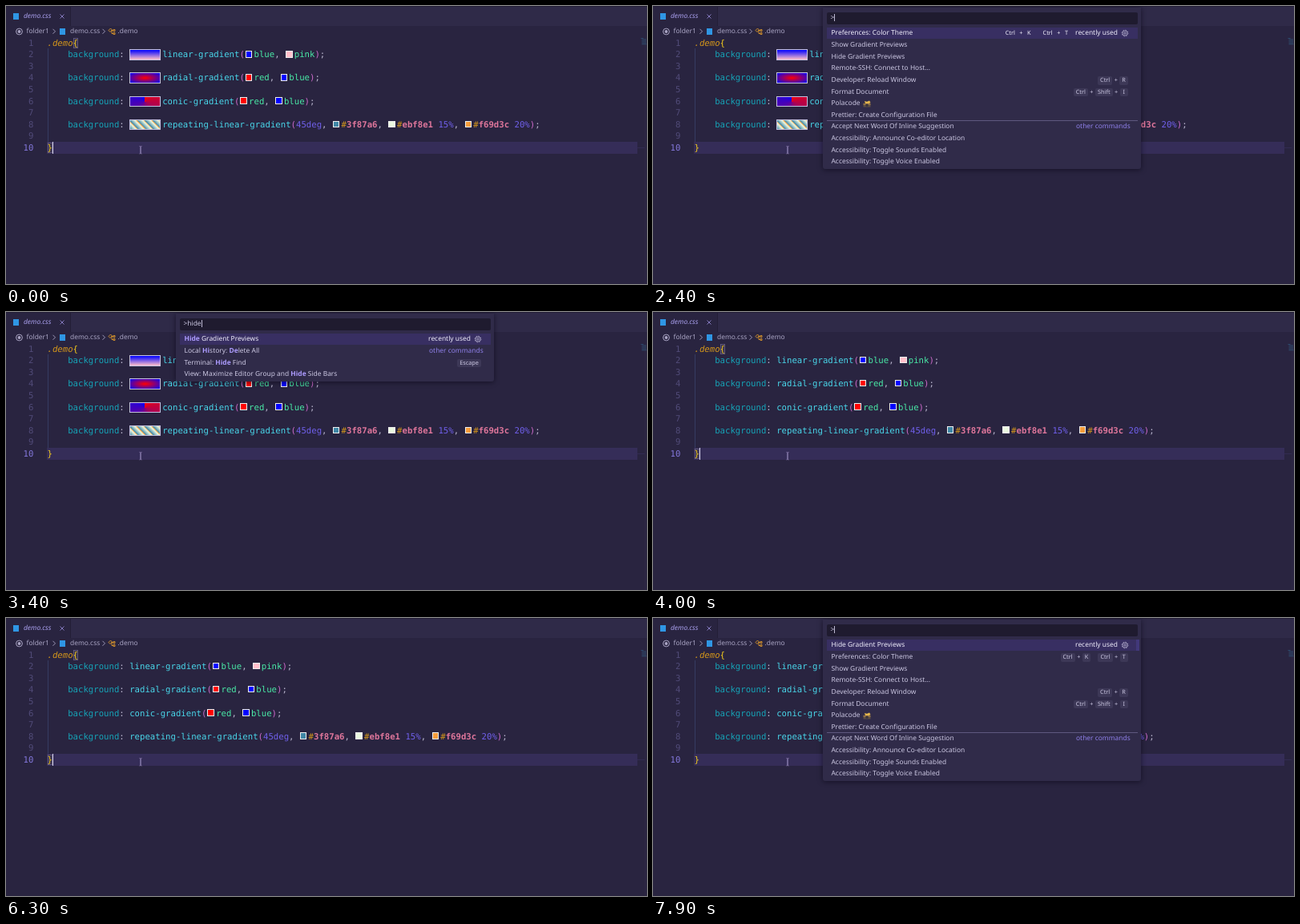
Write an HTML page that moves like this. It is 800 px wide and 348 px high and loops after 8000 ms.

```html
<!DOCTYPE html>
<html lang="en">
<head>
<meta charset="utf-8">
<title>Gradient previews</title>
<style>
  html, body { margin: 0; width: 100%; height: 100%; overflow: hidden; background: #292440; }
  body { position: relative; font: 8.42px/14.61px "Noto Sans", sans-serif; color: #aaa5c4;
    text-rendering: geometricPrecision; white-space: pre; }
  .abs, .abs > * { position: absolute; }
  .hide { visibility: hidden !important; }
  svg { position: absolute; left: 0; top: 0; overflow: visible; }

  #strip { left: 0; top: 0; width: 800px; height: 25px; background: #2f2a48; border-top: 1px solid #231e36; box-sizing: border-box; }
  #tab { left: 0; top: 1px; width: 79.5px; height: 24px; background: #292440; border-right: 1px solid #231e36; }
  #tabName { left: 22px; top: 5.5px; font-style: italic; color: #aaa0ee; }
  .crumb { top: 24.6px; }
  .icon { background: #2f96e4; }

  /* editor */
  #code { left: 0; top: 39.5px; font: 10.66px/14.61px "DejaVu Sans Mono", monospace; color: #b9b5cd; }
  .line { left: 51.5px; height: 14.61px; }
  .num { left: 0; width: 34.4px; text-align: right; color: #514b78; }
  .num.now { color: #8478dc; }
  #current { left: 51px; top: 170.3px; width: 737px; height: 14.5px; background: #352d58; }
  #guide { left: 51.6px; top: 53.4px; width: 1px; height: 117px; background: #363b62; }
  #cursor { left: 57.6px; top: 170.3px; width: 1.3px; height: 14.6px; background: #d6d2ec; }
  .sel { color: #d5971a; font-style: italic; }
  .brace { color: #f5cd1c; }
  .prop { color: #16a3b6; }
  .fn { color: #49d6e9; }
  .par { color: #ce6bcb; }
  .name { color: #49e9a6; }
  .numb { color: #7060eb; }
  .hash { color: #d5971a; }
  .hex { color: #df769b; font-weight: bold; }
  .match .brace { box-shadow: inset 0 0 0 .8px #6b6285; background: #362f4d; }
  .swatch { display: inline-block; box-sizing: border-box; width: .8em; height: .8em;
    margin: 0 .2em 0 .1em; border: .1em solid #eee; }
  .view { display: inline-block; box-sizing: border-box; width: 38.6px; height: 13.4px;
    margin-right: 2.4px; vertical-align: -3px; border: 1px solid #c4c1e0; }
  .plain .view { display: none; }

  /* command palette */
  #palette { left: 212px; top: 1.5px; width: 397px; background: #302b49; border-radius: 0 0 3px 3px;
    box-shadow: 0 1px 6px rgba(8, 5, 20, .6); color: #cbc7e2; overflow: hidden; }
  #field { left: 4.5px; top: 6.5px; width: 383px; height: 14.5px; padding-left: 5px; background: #1f1b2f; border-radius: 2px; }
  #caret { display: inline-block; width: .9px; height: 9px; vertical-align: -1.6px; background: #bdb9d2; }
  #list { left: 4.5px; top: 25.2px; width: 388px; }
  .row { left: 0; width: 388px; height: 14.61px; }
  .row > span { position: absolute; left: 6px; top: .8px; }
  .row.on { background: #382f62; color: #f0eefc; }
  .row.rule { box-shadow: 0 -.8px #6c648d; }
  .row .side { left: auto; right: 11.6px; display: flex; align-items: center; height: 14.61px; }
  .row.on .side { right: 24.6px; }
  .row .other { left: auto; right: 8.8px; color: #8f80ea; }
  .key { min-width: 4.2px; height: 10.6px; padding: 0 3px; text-align: center; border-radius: 2px;
    background: #3d3857; font-size: 7.3px; line-height: 10.4px; }
  .key.bare { background: none; }
  .plus { margin: 0 2.5px; font-size: 7.3px; }
  .gap { width: 9px; }
  .tag { margin-left: 6px; }
  .row b { color: #ad9cff; }
  #thumb { left: 390.5px; top: 25.2px; width: 4.5px; height: 14px; background: #41387a; }
</style>
</head>
<body>
<div class="abs" id="strip"></div>
<div class="abs" id="tab"></div>
<div class="abs icon" style="left:9px;top:9px;width:7px;height:8px"></div>
<div class="abs" id="tabName">demo.css</div>

<div class="abs crumb" style="left:25.5px">folder1</div>
<div class="abs icon" style="left:67px;top:28px;width:7px;height:7.5px"></div>
<div class="abs crumb" style="left:80px">demo.css</div>
<div class="abs crumb" style="left:139.5px">.demo</div>

<div class="abs" id="current"></div>
<div class="abs" id="guide"></div>
<div class="abs" id="code"></div>
<div class="abs" id="cursor"></div>

<svg width="800" height="348" fill="none">
  <path d="M67.500 10.500l5 5m0-5l-5 5" stroke="#9085d0" stroke-width=".9"/>
  <circle cx="16.500" cy="32" r="3.900" stroke="#aaa5c4"/>
  <circle cx="16.500" cy="32" r="1.900" fill="#aaa5c4"/>
  <path d="M58.500 28.800l3 3-3 3M120.500 28.800l3 3-3 3" stroke="#aaa5c4" stroke-width=".9"/>
  <path d="M128 30.500l2.500-2.500 2 2-2.500 2.500zM131.500 30.500h2.500m-2 0v4h2M134 29.500h2v2h-2zM134 33.500h2v2h-2z" stroke="#e09a2c" stroke-width=".9"/>
  <path d="M792.500 40.500h3m-2 1.500h5.500m-5.500 2h5.500m-5.500 2h5.500m-5.500 1.800h6" stroke="#2f5578" stroke-width=".8"/>
  <path d="M797.500 49v299" stroke="#2d2745"/>
  <path d="M788 177.500h9" stroke="#322b52"/>
</svg>

<div class="abs" id="palette">
  <div id="field"><span id="typed"></span><i id="caret"></i></div>
  <div id="list" class="abs"></div>
  <div id="thumb"></div>
</div>

<svg width="800" height="348" fill="none">
  <path d="M166.500 175.500q1.500 0 1.500 1v7.500q0 1-1.500 1M169.500 175.500q-1.500 0-1.500 1v7.500q0 1 1.500 1" stroke="#a292c6" stroke-width=".7"/>
</svg>

<script>
const $ = id => document.getElementById(id);
const span = (cls, text) => `<span class="${cls}">${text}</span>`;

// Editor text
const swatch = color => `<span class="swatch" style="background:${color}"></span>`;
const named = color => swatch(color) + span('name', color);
const hex = (color, stop = '') =>
  swatch(color) + span('hash', '#') + span('hex', color.slice(1)) + (stop && span('numb', ' ' + stop));
const rule = (fn, css, ...args) =>
  '    ' + span('prop', 'background') + ': ' +
  `<span class="view" style="background:${fn}(${css}) padding-box"></span>` +
  span('fn', fn) + span('par', '(') + args.join(', ') + span('par', ')') + ';';

const lines = [
  span('sel', '.demo') + span('brace', '{'),
  rule('linear-gradient', 'blue, pink', named('blue'), named('pink')), '',
  rule('radial-gradient', 'red, blue', named('red'), named('blue')), '',
  rule('conic-gradient', 'red, blue', named('red'), named('blue')), '',
  rule('repeating-linear-gradient', '45deg, #3f87a6, #ebf8e1 15%, #f69d3c 20%',
    span('numb', '45deg'), hex('#3f87a6'), hex('#ebf8e1', '15%'), hex('#f69d3c', '20%')), '',
  span('brace', '}')
];
const PITCH = 14.61;
$('code').innerHTML = lines.map((html, i) => {
  const top = `style="top:${i * PITCH}px"`;
  return `<div class="num${i === 9 ? ' now' : ''}" ${top}>${i + 1}</div><div class="line" ${top}>${html}</div>`;
}).join('');

// Palette rows: [label, keys, section]
const camera = `<svg style="left:39px;top:2.500px" width="10" height="9">
  <path d="M.5 3.500h9v5h-9z" fill="#5d4f45"/><path d="M.5 4.500h9v1h-9z" fill="#c2924a"/>
  <circle cx="5" cy="6.300" r="1.700" fill="#38323f"/><path d="M2 1l3 .8 3-1.300 1.500 2-1.500 1.500h-5z" fill="#e3b64c"/></svg>`;
const gear = `<svg style="left:372px;top:7.300px" fill="none" stroke="#b5b0cf" stroke-width=".8">
  <circle r="3.100"/><circle r="3.900" stroke-dasharray="1.530"/><circle r="1.200"/></svg>`;

const theme = ['Preferences: Color Theme', 'Ctrl K,Ctrl T'];
const show = ['Show Gradient Previews'];
const hide = ['Hide Gradient Previews'];
const rest = [
  ['Remote-SSH: Connect to Host...'],
  ['Developer: Reload Window', 'Ctrl R'],
  ['Format Document', 'Ctrl Shift I'],
  ['Polacode ' + camera],
  ['Prettier: Create Configuration File'],
  ['Accept Next Word Of Inline Suggestion', '', 'other'],
  ['Accessibility: Announce Co-editor Location'],
  ['Accessibility: Toggle Sounds Enabled'],
  ['Accessibility: Toggle Voice Enabled']
];
const lists = {
  first: [theme, show, hide, ...rest],
  found: [
    ['<b>Hide</b> Gradient Previews'],
    ['Local <b>Hi</b>story: <b>De</b>lete All', '', 'other'],
    ['Terminal: <b>Hide</b> Find', 'Escape'],
    ['View: Maximize Editor Group and <b>Hide</b> Side Bars']
  ],
  again: [hide, theme, show, ...rest]
};

function keyHtml(keys, bare) {
  const key = k => span(bare ? 'key bare' : 'key', k);
  return keys.split(',').map(chord => chord.split(' ').map(key).join(span('plus', '+'))).join(span('gap', ''));
}
function rowHtml([label, keys, section], i) {
  const on = i === 0;
  const side = (keys ? keyHtml(keys, on) : '') + (on ? span('tag', 'recently used') : '');
  return `<div class="row${on ? ' on' : ''}${section && i > 1 ? ' rule' : ''}" style="top:${i * PITCH}px">` +
    span('', label) + span('side', side) + (section ? span('other', 'other commands') : '') + (on ? gear : '') + '</div>';
}

let listName = '';
function showList(name) {
  if (name === listName) return;
  listName = name;
  $('list').innerHTML = lists[name].map(rowHtml).join('');
  $('palette').style.height = lists[name].length * PITCH + 27 + 'px';
}

// Timeline in ms; the editor reacts to the palette one LAG later
const LOOP = 8000, OPEN = 1000, CLOSE = 3900, REOPEN = 7800, BLINK = 500, LAG = 100;
const keyTimes = [2800, 2900, 3100, 3200];
const visible = (id, on) => $(id).classList.toggle('hide', !on);
const blinkOn = since => Math.floor(since / BLINK) % 2 === 0;
const isOpen = t => t >= REOPEN || (t >= OPEN && t < CLOSE);

function render(t) {
  const again = t >= REOPEN;
  const open = isOpen(t);
  const typed = again ? 0 : keyTimes.filter(k => t >= k).length;

  visible('cursor', !open && blinkOn(t < OPEN ? t : t - CLOSE));
  $('code').classList.toggle('match', !isOpen(t - LAG));
  $('code').classList.toggle('plain', t >= CLOSE + LAG);

  visible('palette', open);
  visible('thumb', again);
  showList(again ? 'again' : typed > 1 ? 'found' : 'first');
  $('typed').textContent = '>' + 'hide'.slice(0, typed);
  const since = again ? REOPEN : typed ? keyTimes[typed - 1] : OPEN;
  visible('caret', open && blinkOn(t - since));
}

function tick() {
  render(performance.now() % LOOP);
  requestAnimationFrame(tick);
}
tick();
</script>
</body>
</html>
```
